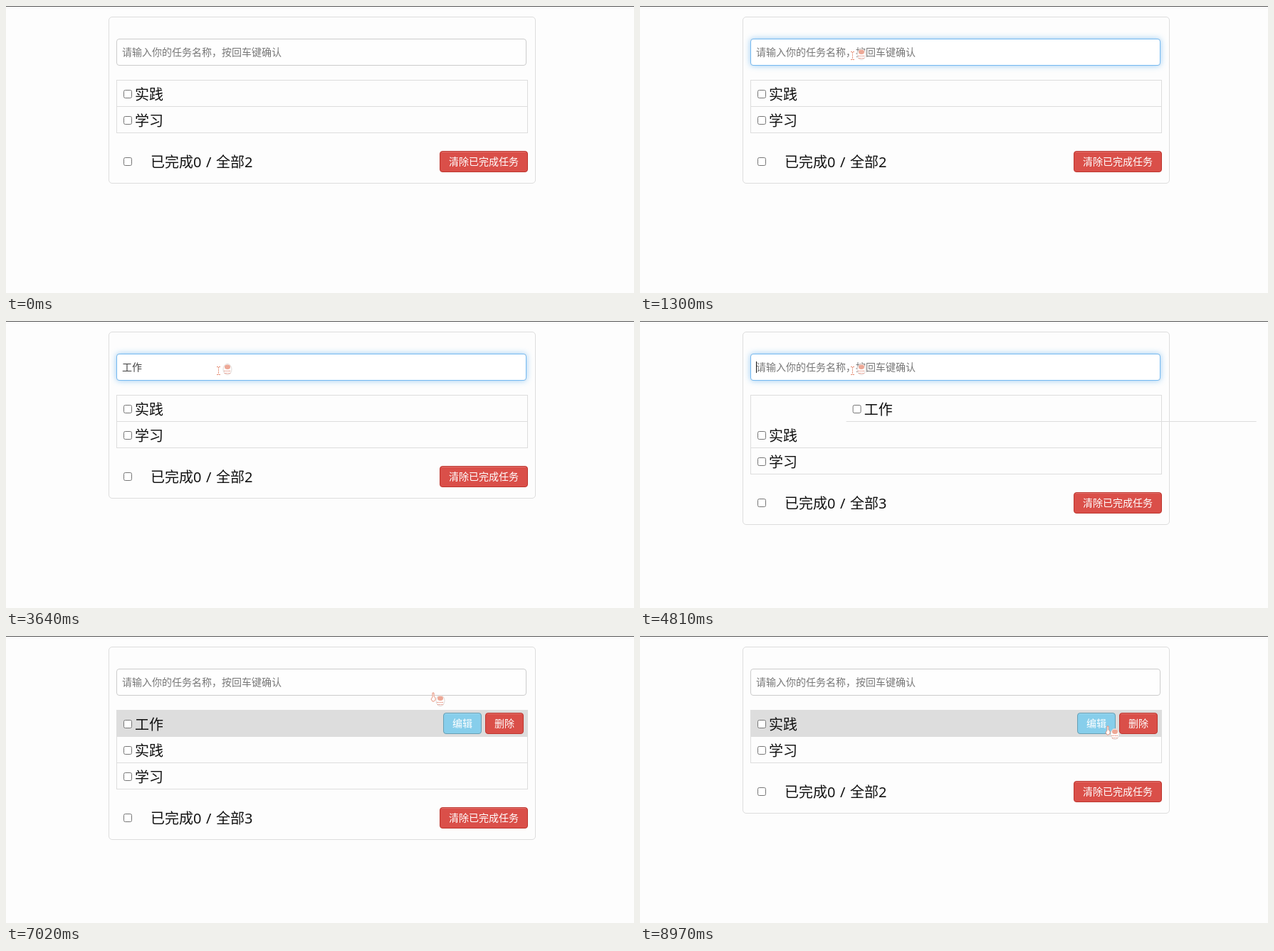
An HTML page that plays this animation: 882 by 404 pixels, repeating every 9100 ms.

```html
<!DOCTYPE html>
<html lang="zh">
<head>
<meta charset="utf-8">
<title>任务列表</title>
<style>
  html, body { margin: 0; width: 100%; height: 100%; overflow: hidden; background: #fdfdfd; }
  svg { display: block; width: 882px; height: 404px; }
  text { font-family: "Noto Sans", "Noto Sans CJK SC", "Noto Sans CJK", sans-serif; white-space: pre; }
  .big { font-size: 20px; fill: #111; }
  .small { font-size: 14px; }
  #typed { font-family: "Liberation Sans", "Noto Sans CJK SC", "Noto Sans CJK", sans-serif; fill: #444; }
  .line { fill: none; stroke: #ddd; }
</style>
</head>
<body>
<svg viewBox="0 0 882 404" xmlns="http://www.w3.org/2000/svg">
  <defs>
    <filter id="blur" x="-5%" y="-60%" width="110%" height="220%"><feGaussianBlur stdDeviation="4"/></filter>
  </defs>
  <rect width="882" height="404" fill="#fdfdfd"/>
  <rect width="882" height="1" fill="#555"/>
  <rect id="panel" class="line" x="144.5" y="15.5" width="599" rx="4.5"/>
  <rect id="glow" x="155" y="46" width="576" height="38" rx="4" fill="#52a8ec" filter="url(#blur)"/>
  <rect x="155.5" y="46.5" width="575" height="37" rx="3.5" fill="#fefefe" stroke="#ccc"/>
  <rect id="ring" x="155.5" y="46.5" width="575" height="37" rx="3.5" fill="#fff" stroke="#75b9f0"/>
  <text id="hint" class="small" x="163" y="69.5" fill="#777">请输入你的任务名称，按回车键确认</text>
  <text id="typed" class="small" x="163" y="69.5"></text>
  <path id="underline" stroke="#666" stroke-dasharray="1 1"/>
  <path id="caret" stroke="#111"/>
  <rect id="list" class="line" x="155.5" y="104.5" width="577"/>
  <g id="rows"></g>
  <g id="footer"></g>
  <g id="pointer"></g>
</svg>
<script>
const LOOP = 9100, STEP = 130, ROW = 37, ROW_WIDTH = 576, SLIDE = 500;
const FOCUS = 700, ADD = 4550, BLUR = 6630, REMOVE = 7410;
const ENTER_END = 4926, LEAVE_START = 7416;

const $ = id => document.getElementById(id);
const clamp = v => Math.max(0, Math.min(1, v));
const show = (el, on) => el.setAttribute('visibility', on ? 'visible' : 'hidden');
const set = (el, attrs) => Object.entries(attrs).forEach(([k, v]) => el.setAttribute(k, v));
const latest = (steps, t) => steps.reduce((value, [at, next]) => t >= at ? next : value, steps[0][1]);

const checkbox = (x, y) =>
  `<rect x="${x + .5}" y="${y + .5}" width="11" height="11" rx="2" fill="#fff" stroke="#767676"/>`;

const button = (x, y, width, label, fill, stroke) =>
  `<rect x="${x + .5}" y="${y + .5}" width="${width - 1}" height="29" rx="3.5" fill="${fill}" stroke="${stroke}"/>
   <path d="M${x + 3} ${y + 1.5}h${width - 6}" stroke="#fff" opacity=".2"/>
   <text class="small" x="${x + 13}" y="${y + 20}" fill="#fff">${label}</text>`;

const RED = ['#da4f49', '#bd362f'], BLUE = ['#87ceeb', '#679fb4'];

const rows = ['工作', '实践', '学习'].map((label, i) => {
  const el = document.createElementNS('http://www.w3.org/2000/svg', 'g');
  el.innerHTML = `<g>
      <rect x="156" width="${ROW_WIDTH}" height="36" fill="#ddd"/>
      ${button(614, 3, 54, '编辑', ...BLUE)}${button(673, 3, 54, '删除', ...RED)}
    </g>
    ${checkbox(165, 13)}<text class="big" x="181" y="26.5">${label}</text>
    ${i < 2 ? `<path class="line" d="M156 36.5h${ROW_WIDTH}"/>` : ''}`;
  $('rows').append(el);
  return { el, tools: el.firstElementChild };
});

$('footer').innerHTML = `${checkbox(165, 213)}
  <text class="big" y="226.5"><tspan x="203">已完成0</tspan><tspan x="281">/</tspan><tspan x="295" id="total"></tspan></text>
  ${button(609, 204, 124, '清除已完成任务', ...RED)}`;

// The pointer: a small mark plus a little round companion beside it.
const marks = {
  arrow: '<path d="M0 0v6l4-3z" fill="#ee9a84"/>',
  beam: '<path d="M-2-5.5h5M-2 5.5h5M.5-5v10" stroke="#e58a70" stroke-dasharray="2 1"/>',
  hand: '<path d="M0 0h2v5l2 2v3l-2 2h-2l-2-3 2-3z" fill="#fff" stroke="#e58a70" stroke-width=".9"/>'
};
const companion = (x, y) => `<g transform="translate(${x} ${y})">
  <path d="M-6-2l-1-6 4 3M6-2l1-6-4 3" fill="#fff" stroke="#ee9a84"/>
  <ellipse rx="7.5" ry="7.5" fill="#f8f3f1" stroke="#d9cfca"/>
  <ellipse cx="-1" cy="1" rx="4.5" ry="5" fill="#b5b5b8"/>
  <path d="M2-5q5 3 3 8l-4-3z" fill="#ee9a84"/></g>`;
const seat = (x, y) => `<g transform="translate(${x} ${y}) scale(.8)">
  <ellipse rx="7.5" ry="9.5" fill="#fff" stroke="#d8cfcb"/>
  <ellipse cy="-4" rx="5" ry="4" fill="#eda896"/>
  <path d="M-6 3h12M-5 7h10" stroke="#d96650" stroke-dasharray="2 1"/></g>`;
const pointers = {
  arrow: marks.arrow + companion(13, 12),
  beam: marks.beam + seat(13, -2),
  hand: marks.hand + seat(11, 11)
};
$('pointer').innerHTML = Object.values(pointers).map(p => `<g>${p}</g>`).join('');
const pointerParts = Object.fromEntries(Object.keys(pointers).map((k, i) => [k, $('pointer').children[i]]));

const path = [
  [260, 348, 192], [390, 324, 101], [520, 304, 78], [650, 298, 70],
  [5200, 298, 70], [5460, 360, 84], [5850, 520, 124], [6110, 597, 134],
  [6500, 696, 123], [6760, 696, 123], [7150, 550, 59], [8320, 550, 59],
  [8580, 582, 82], [8840, 640, 120], [8970, 656, 127]
];
function pointerAt(t) {
  const i = path.findIndex(p => p[0] > t);
  if (i < 0) return path[path.length - 1].slice(1);
  if (i === 0) return path[0].slice(1);
  const [a, b] = [path[i - 1], path[i]], k = (t - a[0]) / (b[0] - a[0]);
  return [a[1] + (b[1] - a[1]) * k, a[2] + (b[2] - a[2]) * k];
}
function pointerKind(t, x, y, hovered) {
  if (t >= 7020 && t < 8450) return 'hand';
  if (y > 46 && y < 84) return 'beam';
  const overButton = hovered >= 0 && (x > 614 && x < 668 || x > 673 && x < 727) && y < 138;
  return overButton ? 'hand' : 'arrow';
}

const typing = [[0, ''], [2210, 'g'], [2470, 'gon'], [2600, 'gong'], [2730, "gong'zuo"], [3250, '工作'], [ADD, '']];
const caretEarly = [[0, true], [1300, false], [1950, true], [3640, false], [4290, true]];

function drawInput(t) {
  const focus = clamp((t - FOCUS) / 200) * (1 - clamp((t - BLUR) / 200));
  set($('glow'), { opacity: .6 * focus });
  set($('ring'), { opacity: focus });

  const value = latest(typing, t);
  $('typed').textContent = value;
  show($('hint'), !value);
  const end = 163 + (value ? $('typed').getComputedTextLength() : 0);
  set($('underline'), { d: `M163 72.5H${end}` });
  show($('underline'), value && t < 3250);

  const blinkOn = t < ADD ? latest(caretEarly, t) : Math.floor((t - ADD) / 530) % 2 === 0;
  set($('caret'), { d: `M${Math.floor(end) + .5} 57v16` });
  show($('caret'), t >= FOCUS && t < BLUR && blinkOn);
}

function render(t) {
  const added = t >= ADD && t < LEAVE_START + SLIDE;
  const count = added ? 3 : 2, shift = added ? ROW : 0;
  const slide = t < REMOVE ? clamp((ENTER_END - t) / SLIDE) : clamp((t - LEAVE_START) / SLIDE);
  const [x, y] = pointerAt(t);

  let hovered = -1;
  if (t >= BLUR && t < REMOVE) hovered = 0;
  else if (t >= 260 && x > 156 && x < 732 && y >= 105) hovered = Math.floor((y - 105) / ROW);

  set($('panel'), { height: 234 + shift });
  set($('list'), { height: count * ROW });
  set($('footer'), { transform: `translate(0 ${shift})` });
  $('total').textContent = '全部' + (added && t < REMOVE ? 3 : 2);

  rows.forEach(({ el, tools }, i) => {
    const place = added ? i : i - 1;
    el.style.display = place < 0 ? 'none' : '';
    set(el, { transform: `translate(${i === 0 ? slide * ROW_WIDTH : 0} ${105 + place * ROW})` });
    show(tools, place === hovered);
  });

  drawInput(t);

  const kind = pointerKind(t, x, y, hovered);
  set($('pointer'), { transform: `translate(${Math.round(x)} ${Math.round(y)})` });
  for (const name in pointerParts) show(pointerParts[name], t >= 260 && name === kind);
}

const start = performance.now();
function tick() {
  const t = (performance.now() - start) % LOOP;
  render(Math.floor(t / STEP) * STEP);
  requestAnimationFrame(tick);
}
tick();
</script>
</body>
</html>
```
